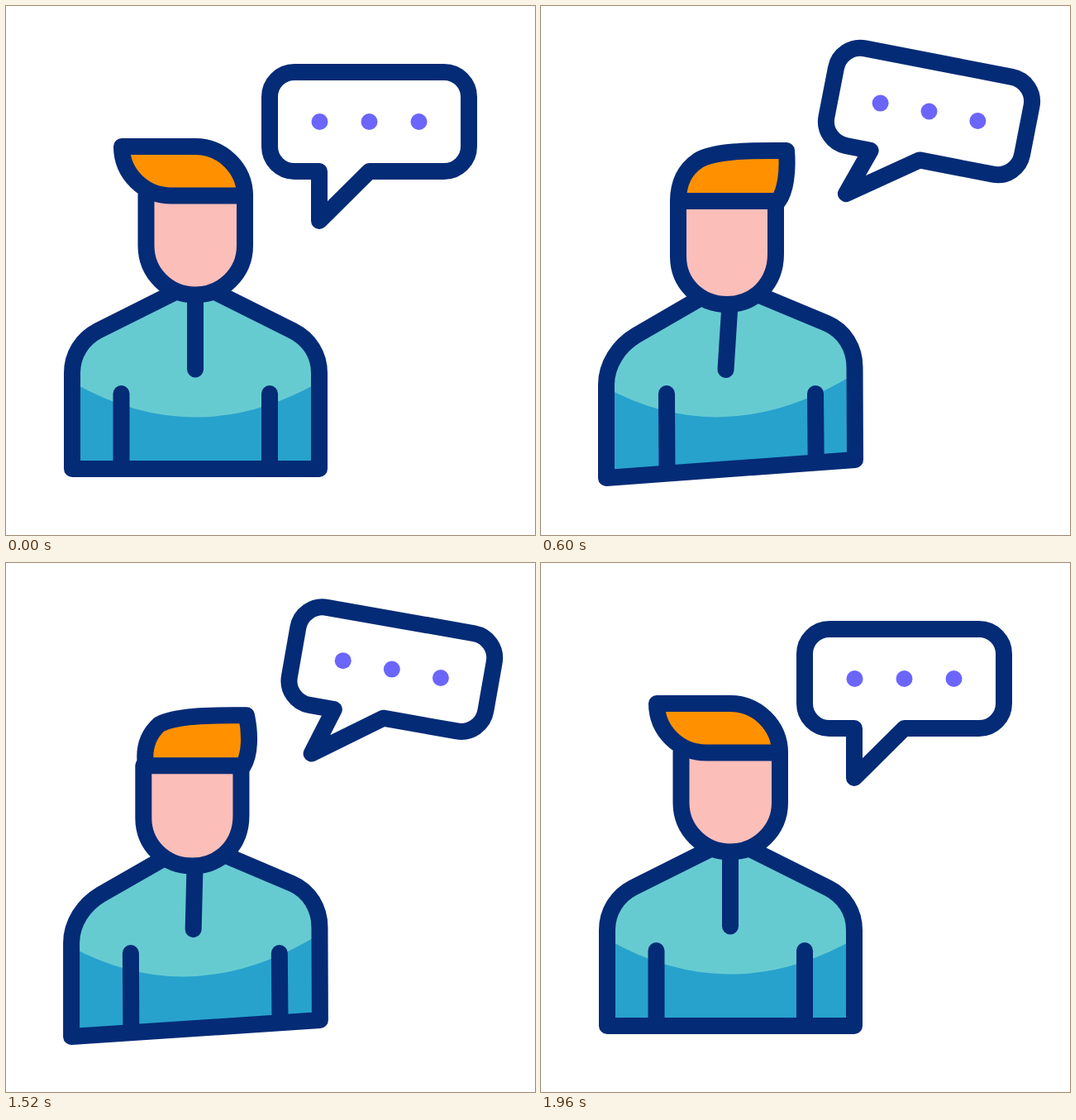
These frames come from a looping animation (640x640 px, 2000 ms). An HTML page:

```html
<!DOCTYPE html>
<html lang="en">
<head>
<meta charset="utf-8">
<title>Person talking</title>
<style>
  html, body { margin: 0; width: 100%; height: 100%; overflow: hidden; background: #fff; }
  svg { display: block; width: 100vw; height: 100vh; }
  .line { fill: none; stroke: #042b76; stroke-width: 20; stroke-linecap: round; stroke-linejoin: round; }
  #shirt { fill: #66cbd1; }
  #shade { fill: #27a2cd; }
  #face { fill: #fcbeb9; }
  #hair { fill: #ff9100; }
  #bubble { fill: #fff; }
  #dots { fill: #6b66f9; }
</style>
</head>
<body>
<svg viewBox="0 0 640 640">
  <path id="shirt"/>
  <path id="shade"/>
  <path id="outline" class="line"/>
  <path id="arms" class="line"/>
  <path id="collar" class="line"/>
  <path id="face" class="line"/>
  <path id="hair" class="line"/>
  <path id="bubble" class="line"/>
  <g id="dots"><circle r="10"/><circle r="10"/><circle r="10"/></g>
</svg>
<script>
  const LOOP = 2000;
  const $ = id => document.getElementById(id);
  const dots = [...document.querySelectorAll('#dots circle')];

  const ease = s => s * s * (3 - 2 * s);

  // Eased value through [time, value] keys
  function track(t, keys) {
    if (t <= keys[0][0]) return keys[0][1];
    for (let i = 1; i < keys.length; i++) {
      const [t0, v0] = keys[i - 1], [t1, v1] = keys[i];
      if (t < t1) return v0 + (v1 - v0) * ease((t - t0) / (t1 - t0));
    }
    return keys[keys.length - 1][1];
  }

  const TURN = [[120, 0], [560, 1], [1440, 1], [1880, 0]];
  const DIP = [[110, 0], [320, 1], [560, 0], [1440, 0], [1680, 1], [1890, 0]];
  const BOUNCE = [[560, 0], [780, 17], [980, -18], [1280, 0]];

  function draw(t) {
    const turn = track(t, TURN), dip = track(t, DIP);

    // Point between the front pose (x, y) and the turned pose (u, v), lowered by the dip
    const point = (sink, slide = 0) => (x, y, u, v) =>
      `${(x + (u - x) * turn + slide * dip).toFixed(2)} ${(y + (v - y) * turn + sink * dip).toFixed(2)} `;
    const body = point(11.5), chin = point(25), top = point(36.8);

    const torso =
      'M' + body(80, 560, 79, 571) + 'L' + body(80, 444, 79, 458) +
      'C' + body(80, 422, 79, 434) + body(92, 403, 94, 411) + body(111, 393, 115, 398.5) +
      'L' + body(207, 345, 197, 351) + 'L' + body(251, 345, 262, 349) +
      'L' + body(347, 393, 346, 384) +
      'C' + body(367, 403, 367, 393) + body(379, 422, 379.5, 414) + body(379, 444, 379.5, 437) +
      'L' + body(379, 560, 380, 549) + 'Z';
    $('shirt').setAttribute('d', torso);
    $('outline').setAttribute('d', torso);

    $('shade').setAttribute('d',
      'M' + body(80, 455, 79, 462) + 'Q' + body(229, 540, 225, 540.5) + body(379, 455, 379.5, 445) +
      'L' + body(379, 560, 380, 549) + 'L' + body(80, 560, 79, 571) + 'Z');

    $('arms').setAttribute('d',
      'M' + body(139.5, 469, 152, 469) + 'L' + body(139.5, 560, 152.5, 565) +
      'M' + body(319, 469, 332, 469) + 'L' + body(319, 560, 332.7, 552));

    $('collar').setAttribute('d',
      'M' + chin(229, 350, 228.5, 361) + 'L' + point(12, 10)(229, 439.5, 223.5, 440));

    $('face').setAttribute('d',
      'M' + top(169.5, 228, 166, 236) + 'L' + chin(169.5, 290, 166, 303) +
      'C' + chin(169.5, 323, 166, 336) + chin(196, 349.5, 192, 361) + chin(229, 349.5, 225, 361) +
      'C' + chin(262, 349.5, 259, 361) + chin(289, 323, 284, 335) + chin(289, 290, 284, 300) +
      'L' + top(289, 229.5, 284, 236));

    $('hair').setAttribute('d',
      'M' + top(140, 170, 190, 187) +
      'C' + top(170, 170, 208, 175.5) + top(199, 170, 250, 174.5) + top(229, 170, 297, 175) +
      'C' + top(262, 170, 299, 200) + top(289, 197, 296, 224) + top(289, 229.5, 287, 236) +
      'L' + top(200, 229.5, 166, 236) +
      'C' + top(167, 229.5, 166, 213) + top(140, 203, 174, 198) + top(140, 170, 190, 187) + 'Z');

    const cx = 439.5 + 30 * turn, cy = 140 - 12.5 * turn, angle = 11 * turn;
    $('bubble').setAttribute('transform', `translate(${cx} ${cy}) rotate(${angle})`);
    $('bubble').setAttribute('d',
      'M-60.5 60H-90.5A30 30 0 0 1-120.5 30V-30A30 30 0 0 1-90.5-60H90.5' +
      'A30 30 0 0 1 120.5-30V30A30 30 0 0 1 90.5 60H0' +
      `L${-60.5 - 19.2 * turn} ${120 - 3 * turn}Z`);

    const rad = angle * Math.PI / 180;
    dots.forEach((dot, i) => {
      const r = (i - 1) * 60;
      dot.setAttribute('cx', cx + r * Math.cos(rad));
      dot.setAttribute('cy', cy + r * Math.sin(rad) + track(t - i * 40, BOUNCE));
    });
  }

  const start = performance.now();
  function frame() {
    draw((performance.now() - start) % LOOP);
    requestAnimationFrame(frame);
  }
  frame();
</script>
</body>
</html>
```
